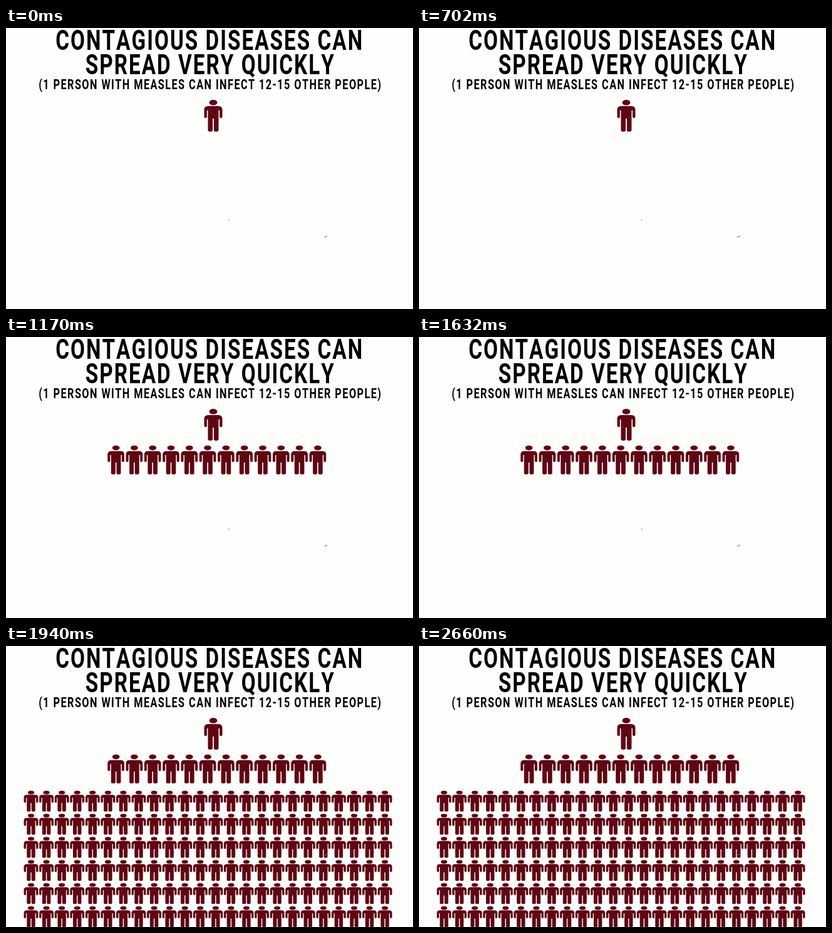
Recreate the animation shown at these times as an HTML page. Size 650x450 px, loop 3.14 s.

```html
<!DOCTYPE html>
<html lang="en">
<head>
<meta charset="utf-8">
<title>Contagious diseases</title>
<style>
  html, body { margin: 0; width: 100%; height: 100%; overflow: hidden; background: #fefefd; }
  svg { display: block; width: 650px; height: 450px; }
  text {
    font: 700 45px Roboto, "Liberation Sans", sans-serif;
    font-kerning: none;
    letter-spacing: .06em;
    text-anchor: middle;
    transform: scaleX(.74);
  }
  .note { font-size: 22px; letter-spacing: .088em; }
  .people { fill: #5f0613; }
  #second { animation: second 3140ms step-end infinite; }
  #third { animation: third 3140ms step-end infinite; }
  @keyframes second { 0% { visibility: hidden; } 37.261%, 100% { visibility: visible; } }
  @keyframes third { 0% { visibility: hidden; } 61.783%, 100% { visibility: visible; } }
</style>
</head>
<body>
<svg viewBox="0 0 650 450">
  <defs>
    <g id="person">
      <ellipse cy="4.4" rx="6.4" ry="4.3"/>
      <path d="M-8 10H8Q14.5 10 14.5 16V27a2.2 2.2 0 0 1-4.4 0V17H8.5V48.5a3.8 2.5 0 0 1-7.6 0V30H-.9V48.5a3.8 2.5 0 0 1-7.6 0V17H-10.1V27a2.2 2.2 0 0 1-4.4 0V16Q-14.5 10-8 10Z"/>
    </g>
  </defs>
  <!-- x positions are in the condensed text space -->
  <g>
    <text x="439.5" y="35">CONTAGIOUS DISEASES CAN</text>
    <text x="441" y="74">SPREAD VERY QUICKLY</text>
    <text class="note" x="441" y="98.5">(1 PERSON WITH MEASLES CAN INFECT 12-15 OTHER PEOPLE)</text>
  </g>
  <g fill="none" stroke="#555" stroke-width="1">
    <path d="M354.8 307.5h1.6"/>
    <path d="M508.5 334.8q2-1.2 4.5-1.2"/>
  </g>
  <g class="people">
    <g id="first"></g>
    <g id="second"></g>
    <g id="third"></g>
  </g>
  <path id="glint" d="M508.5 335q2-1.2 4-1.2" fill="none" stroke="#b98a8e" stroke-width=".8" style="animation: third 3140ms step-end infinite"/>
</svg>
<script>
  function addRow(id, count, x, y, pitch, scaleX, scaleY) {
    const group = document.getElementById(id);
    for (let i = 0; i < count; i++) {
      const person = document.createElementNS(group.namespaceURI, 'use');
      person.setAttribute('href', '#person');
      person.setAttribute('transform', `translate(${x + i * pitch} ${y}) scale(${scaleX} ${scaleY})`);
      group.append(person);
    }
  }

  addRow('first', 1, 331, 115, 0, 1, 1);
  addRow('second', 12, 175.6, 173.6, 29.3, .92, .91);
  for (let row = 0; row < 6; row++) {
    addRow('third', 24, 40, 231.8 + row * 37, 24.57, .79, .655);
  }
</script>
</body>
</html>
```
